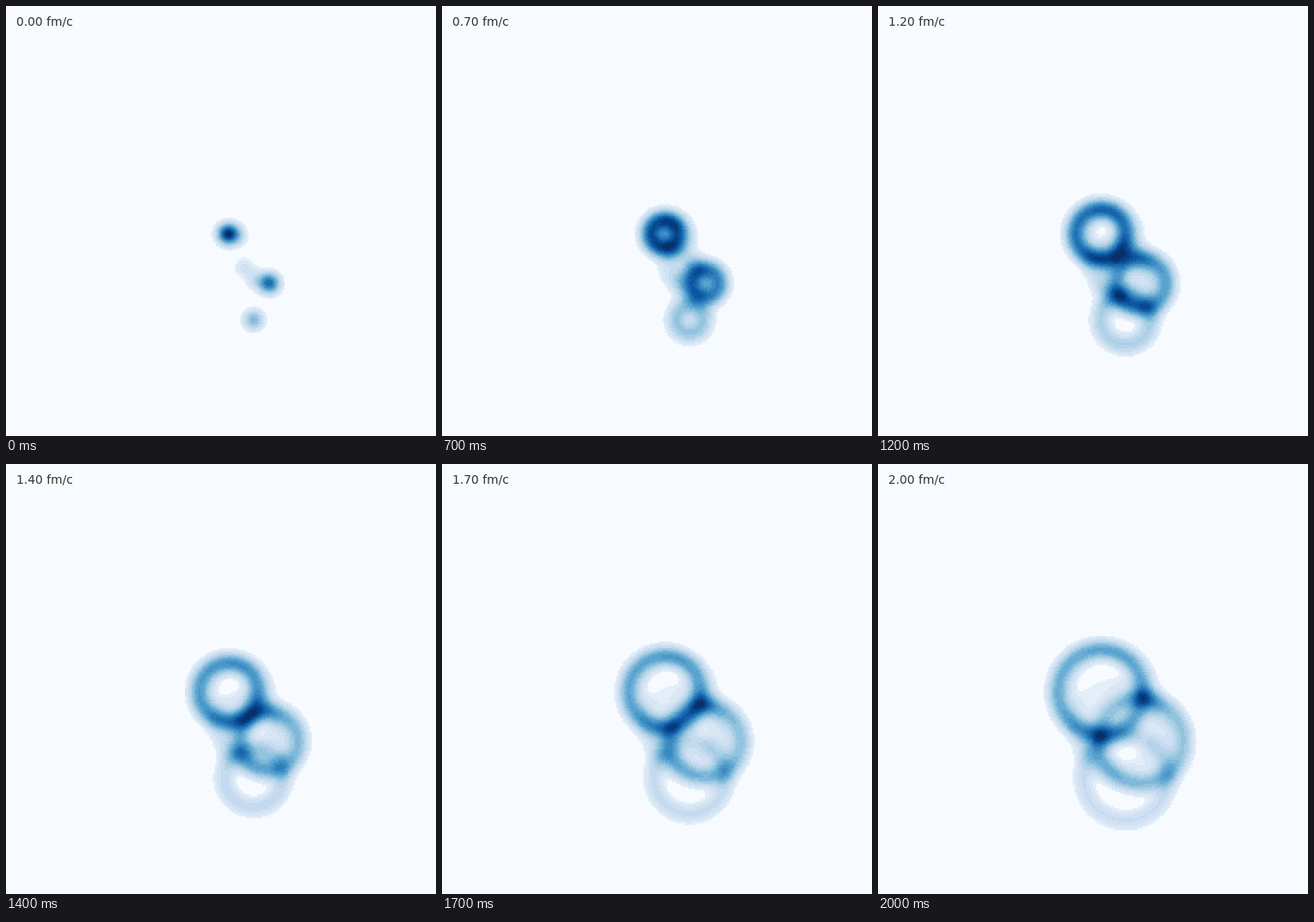
Animation, 500 px wide and 500 px high, one loop 2100 ms. Source, as a matplotlib script:

```python
import numpy as np
import matplotlib.pyplot as plt
from matplotlib.animation import FuncAnimation

FRAMES, STEP_MS, DT = 21, 100, 0.1
PX_PER_FM = 25
WIDTH = 8.4
CELLS = 250
FLOOR, BANDS = 0.07, 20

# x, y, strength of each energy deposit
BLOBS = [
    (258, 265, 1.00),
    (270, 267, 0.20),
    (306.5, 322.5, 0.78),
    (291, 319, 0.20),
    (277, 304, 0.18),
    (288, 365, 0.46),
]

axis = (np.arange(CELLS) + 0.5) * 500 / CELLS
X, Y = np.meshgrid(axis, axis)


def ring(x, y, radius):
    """Gaussian spot streaming outwards equally in all directions."""
    r = np.hypot(X - x, Y - y)
    s2 = WIDTH ** 2
    return np.exp(-(r ** 2 + radius ** 2) / (2 * s2)) * np.i0(r * radius / s2)


def density(t):
    """Total density, scaled to its peak and cut into flat colour bands."""
    field = sum(a * ring(x, y, t * PX_PER_FM) for x, y, a in BLOBS)
    field /= field.max()
    return np.where(field < FLOOR, 0, np.ceil(field * BANDS) / BANDS)


fig = plt.figure(figsize=(5, 5), dpi=100)
ax = fig.add_axes([0, 0, 1, 1])
ax.axis("off")
image = ax.imshow(density(0), cmap="Blues", vmin=0, vmax=1,
                  extent=(0, 500, 500, 0), interpolation="nearest")
label = ax.text(12, 23, "", fontsize=10, color="#333333")


def update(i):
    t = i * DT
    image.set_data(density(t))
    label.set_text(f"{t:.2f} fm/c")
    return image, label


anim = FuncAnimation(fig, update, frames=FRAMES, interval=STEP_MS,
                     repeat=True, repeat_delay=0)
plt.show()
```
